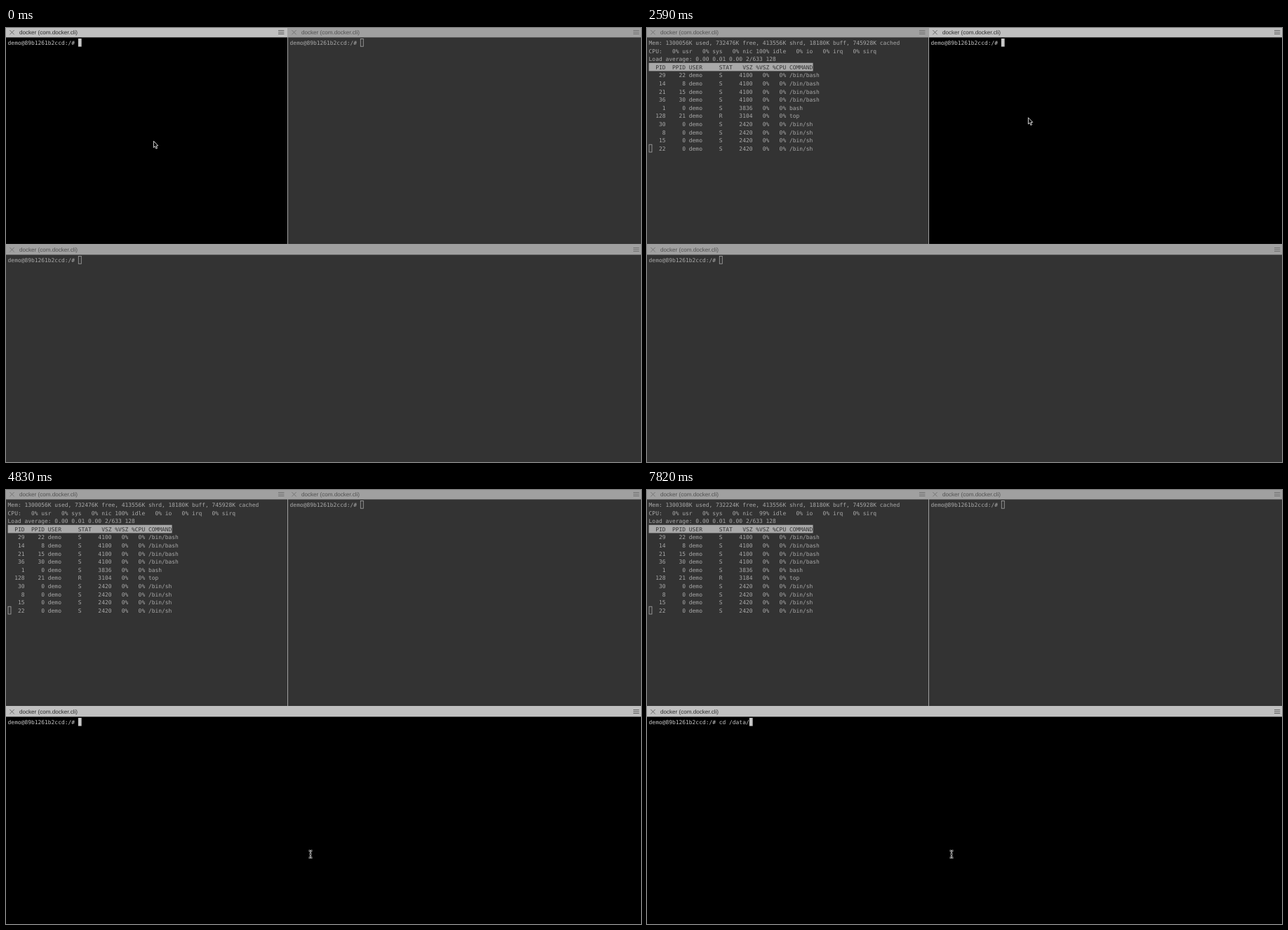
An HTML page with a canvas for the animation above (8000 ms loop, 905 px wide and 619 px high).

```html
<!DOCTYPE html>
<html lang="en">
<head>
<meta charset="utf-8">
<title>Split terminal</title>
<style>
html, body { margin: 0; width: 100%; height: 100%; overflow: hidden; background: #333; }
canvas { display: block; }
</style>
</head>
<body>
<canvas id="stage" width="905" height="619"></canvas>
<script>
const ctx = document.getElementById('stage').getContext('2d');
ctx.textRendering = 'geometricPrecision';

const LOOP = 8000, CELL = 4.775, ROW = 11.6;
const MONO = '7.93px "DejaVu Sans Mono", monospace';
const SANS = '8.08px "Liberation Sans", sans-serif';
const PROMPT = 'demo@89b1261b2ccd:/# ';
const HEADER = '  PID  PPID USER     STAT   VSZ %VSZ %CPU COMMAND';

const ACTIVE = { back: '#000', text: '#c7c7c7', bar: '#c0c0c0', title: '#2a2a2a', icon: '#555' };
const IDLE = { back: '#333', text: '#a9a9a9', bar: '#a0a0a0', title: '#505050', icon: '#6c6c6c' };

const PANES = [
  { x: 0, y: 0, w: 401, h: 308, menu: 388 },
  { x: 402, y: 0, w: 503, h: 308, menu: 894 },
  { x: 0, y: 308, w: 905, h: 311, menu: 894 }
];

// Each track lists [start time, value...]; a value holds until the next start.
const FOCUS = [[0, 0], [2590, 1], [4830, 2]];
const TOP_KEYS = [[0, 0], [500, 2], [650, 3]];
const CD_KEYS = [[0, 0], [6470, 1], [6620, 2], [6770, 3], [6920, 4], [7520, 6], [7820, 9]];
const POINTER = [
  [0, 'arrow', 209.5, 160.5], [1400, 'arrow', 225.5, 146], [1550, 'arrow', 452.5, 209.5],
  [1700, 'arrow', 455.3, 210], [1840, 'arrow', 504.4, 160], [1990, 'arrow', 527.3, 141],
  [2140, 'arrow', 542.5, 127], [4240, 'arrow', 542.5, 132],
  [4380, 'beam', 443, 475], [4530, 'beam', 434, 519.5]
];

const at = (track, t) => track.findLast(step => step[0] <= t);

function box(x, y, w, h, color) {
  ctx.fillStyle = color;
  ctx.fillRect(x, y, w, h);
}

function write(text, x, y, color, font = MONO) {
  ctx.font = font;
  ctx.fillStyle = color;
  ctx.fillText(text, x, y);
}

function path(points, x, y, close) {
  ctx.beginPath();
  points.forEach(([px, py]) => ctx.lineTo(x + px, y + py));
  if (close) ctx.closePath();
}

function stroke(color, width) {
  ctx.strokeStyle = color;
  ctx.lineWidth = width;
  ctx.stroke();
}

function topScreen(t) {
  const later = t >= 6170;
  const process = (pid, parent, size, command, state = 'S') =>
    `${String(pid).padStart(5)}${String(parent).padStart(6)} demo     ${state}     ${size}   0%   0% ${command}`;
  return [
    `Mem: ${later ? '1300308K used, 732224K' : '1300056K used, 732476K'} free, 413556K shrd, 18180K buff, 745928K cached`,
    `CPU:   0% usr   0% sys   0% nic ${later ? ' 99' : '100'}% idle   0% io   0% irq   0% sirq`,
    'Load average: 0.00 0.01 0.00 2/633 128',
    HEADER,
    process(29, 22, 4100, '/bin/bash'),
    process(14, 8, 4100, '/bin/bash'),
    process(21, 15, 4100, '/bin/bash'),
    process(36, 30, 4100, '/bin/bash'),
    process(1, 0, 3836, 'bash'),
    process(128, 21, later ? 3184 : 3104, 'top', 'R'),
    process(30, 0, 2420, '/bin/sh'),
    process(8, 0, 2420, '/bin/sh'),
    process(15, 0, 2420, '/bin/sh'),
    process(22, 0, 2420, '/bin/sh')
  ];
}

function contents(index, t) {
  if (index === 0 && t >= 1250) return { lines: topScreen(t), row: 13, col: 0 };
  let typed = '';
  if (index === 0) typed = 'top'.slice(0, at(TOP_KEYS, t)[1]);
  if (index === 2) typed = 'cd /data/'.slice(0, at(CD_KEYS, t)[1]);
  const line = PROMPT + typed;
  const entered = index === 0 && t >= 1100;
  return { lines: [line], row: entered ? 1 : 0, col: entered ? 0 : line.length };
}

function drawBar(pane, look) {
  const { x, y } = pane, dy = y ? 310 : 0;
  const bottom = dy + 13.4;
  box(x, y, pane.w, bottom - y, look.bar);
  path([[0, 0], [6.4, 6.4]], x + 5.3, dy + 3);
  stroke(look.icon, 0.8);
  path([[6.4, 0], [0, 6.4]], x + 5.3, dy + 3);
  stroke(look.icon, 0.8);
  write('docker (com.docker.cli)', x + 19, dy + 9, look.title, SANS);
  for (let i = 0; i < 3; i++) box(pane.menu, dy + 3.2 + i * 2.4, 8.4, 0.9, look.icon);
}

function drawPane(pane, index, t, active) {
  const look = active ? ACTIVE : IDLE;
  const left = pane.x + 2.6, top = pane.y ? 325 : 15;
  const { lines, row, col } = contents(index, t);
  box(pane.x, pane.y, pane.w, pane.h, look.back);
  drawBar(pane, look);
  lines.forEach((line, i) => {
    const y = top + i * ROW, inverse = line === HEADER;
    if (inverse) box(left, y, line.length * CELL, ROW, look.text);
    write(line, left, y + 8.9, inverse ? look.back : look.text);
  });
  const cx = left + col * CELL, cy = top + row * ROW;
  if (active) {
    box(cx, cy, CELL, ROW, look.text);
  } else {
    ctx.strokeStyle = look.text;
    ctx.lineWidth = 0.8;
    ctx.strokeRect(cx + 0.4, cy + 0.4, CELL - 0.8, ROW - 0.8);
  }
}

const ARROW = [[0.9, 0.8], [0.9, 10], [3, 8.1], [4.4, 11.6], [6, 10.9], [4.6, 7.6], [7.2, 7.4]];
const BEAM = [
  [[-2.5, -5], [-1, -5], [0, -4], [1, -5], [2.5, -5]],
  [[-2.5, 5], [-1, 5], [0, 4], [1, 5], [2.5, 5]],
  [[0, -4], [0, 4]],
  [[-1.4, 0], [1.4, 0]]
];

function drawPointer([, kind, x, y]) {
  if (kind === 'arrow') {
    path(ARROW, x, y, true);
    ctx.fillStyle = '#000';
    ctx.fill();
    stroke('#eee', 0.9);
    return;
  }
  for (const [color, width] of [['#ddd', 2.2], ['#111', 0.8]]) {
    BEAM.forEach(line => {
      path(line, x, y);
      stroke(color, width);
    });
  }
}

function frame() {
  const t = performance.now() % LOOP;
  const focus = at(FOCUS, t)[1];
  PANES.forEach((pane, i) => drawPane(pane, i, t, i === focus));
  box(401, 0, 1, 308, '#a0a0a0');
  drawPointer(at(POINTER, t));
  requestAnimationFrame(frame);
}
frame();
</script>
</body>
</html>
```
